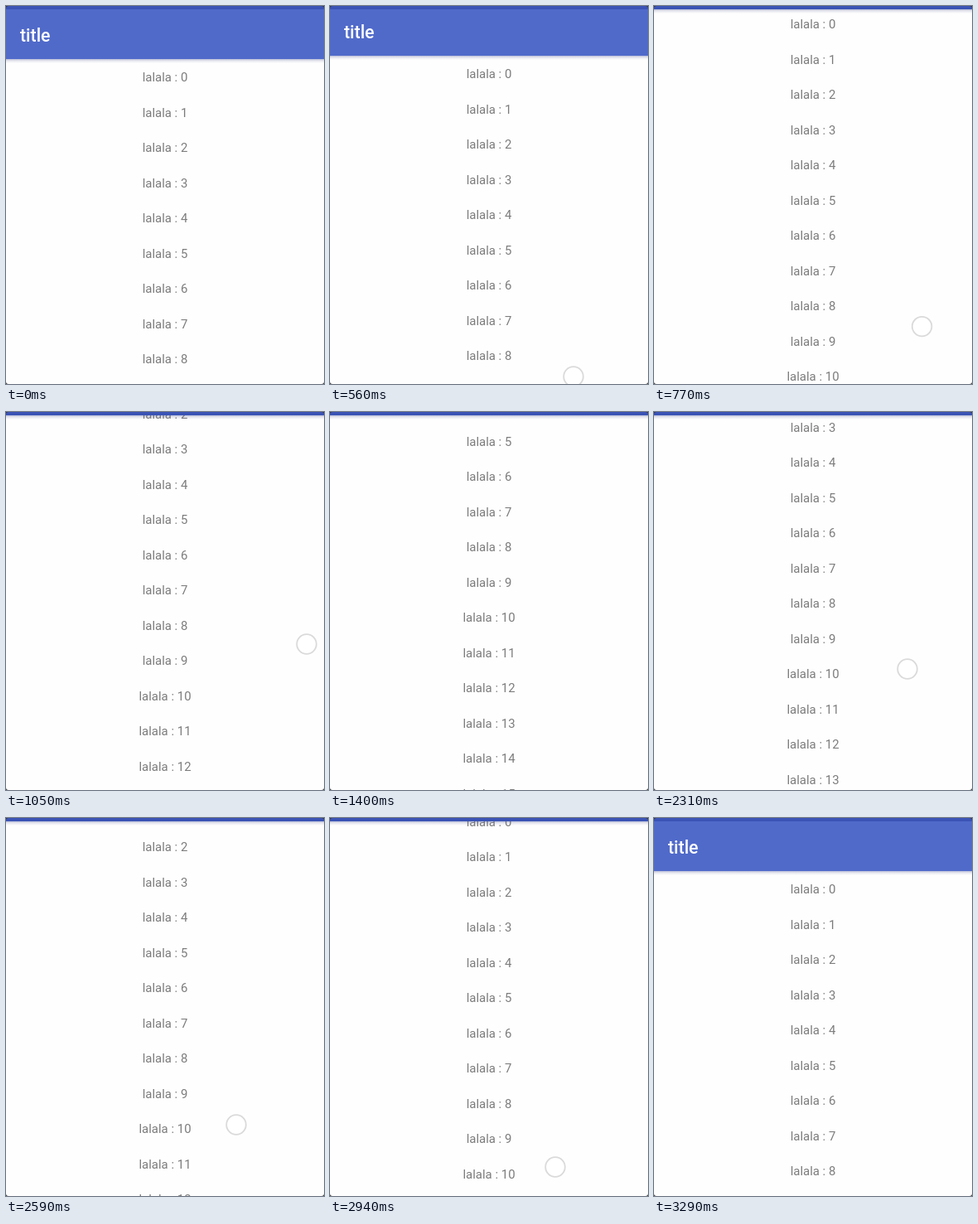
These frames come from a looping animation (384x456 px, 3780 ms). An HTML page with a canvas:

```html
<!DOCTYPE html>
<html lang="en">
<head>
<meta charset="utf-8">
<title>Collapsing toolbar list</title>
<style>
  html, body { margin: 0; width: 100%; height: 100%; overflow: hidden; background: #fefefe; }
  canvas { display: block; width: 384px; height: 456px; }
</style>
</head>
<body>
<canvas id="stage"></canvas>
<script>
const W = 384, H = 456, LOOP = 3780, STEP = 70;
const STATUS = 4, BAR = 60, ROW = 42.5;

const canvas = document.getElementById('stage');
const ctx = canvas.getContext('2d');
const dpr = window.devicePixelRatio || 1;
canvas.width = W * dpr;
canvas.height = H * dpr;
ctx.scale(dpr, dpr);

const linear = u => u;
const speedUp = u => u ** 1.2;
const slowDown = u => 1 - (1 - u) ** 2;

// Keys are [time, value, ease towards this key].
function track(keys, t) {
  const i = keys.findIndex(k => k[0] > t);
  if (i === 0) return keys[0][1];
  if (i < 0) return keys[keys.length - 1][1];
  const [t0, v0] = keys[i - 1], [t1, v1, ease = linear] = keys[i];
  return v0 + (v1 - v0) * ease((t - t0) / (t1 - t0));
}

const scrollKeys = [
  [490, 0], [560, 4], [1050, 168.5, speedUp], [1540, 271, slowDown],
  [1960, 271], [2030, 268], [2310, 195], [2590, 136],
  [2940, 81.5], [3080, 55], [3290, 0]
];

const touches = [
  { from: 560, to: 1190,
    x: [[560, 294], [1050, 363], [1120, 371]],
    y: [[560, 447], [1050, 280, speedUp], [1120, 254]] },
  { from: 1960, to: 3290,
    x: [[1960, 361], [2030, 356], [2310, 306], [2590, 278], [2940, 272]],
    y: [[1960, 220], [2030, 234], [2310, 310], [2590, 370], [2940, 421], [3080, 446], [3220, 475]] }
];

function drawList(scroll) {
  ctx.font = '14.93px Roboto, sans-serif';
  ctx.textAlign = 'center';
  ctx.fillStyle = '#7c7c7c';
  const first = Math.max(0, Math.floor((scroll - 100) / ROW));
  for (let n = first; n < first + 15; n++) {
    ctx.fillText('lalala : ' + n, W / 2, 91 + n * ROW - scroll);
  }
}

function drawToolbar(scroll) {
  const top = STATUS - Math.min(scroll, BAR), bottom = top + BAR;
  const shade = ctx.createLinearGradient(0, bottom, 0, bottom + 5);
  shade.addColorStop(0, 'rgba(70, 80, 150, 0.36)');
  shade.addColorStop(0.5, 'rgba(90, 95, 150, 0.12)');
  shade.addColorStop(1, 'rgba(90, 95, 150, 0)');
  ctx.fillStyle = shade;
  ctx.fillRect(0, bottom, W, 5);

  ctx.fillStyle = '#506aca';
  ctx.fillRect(0, top, W, BAR);
  ctx.font = '500 21.33px Roboto, sans-serif';
  ctx.textAlign = 'left';
  ctx.fillStyle = '#fff';
  ctx.fillText('title', 17, top + 38.5);

  ctx.fillStyle = '#3a53b5';
  ctx.fillRect(0, 0, W, STATUS);
}

function drawTouch(t) {
  const touch = touches.find(p => t >= p.from && t < p.to);
  if (!touch) return;
  ctx.beginPath();
  ctx.arc(track(touch.x, t), track(touch.y, t), 11.8, 0, Math.PI * 2);
  ctx.fillStyle = 'rgba(255, 255, 255, 0.8)';
  ctx.fill();
  ctx.lineWidth = 1.8;
  ctx.strokeStyle = '#dadada';
  ctx.stroke();
}

function drawCorners() {
  ctx.beginPath();
  ctx.rect(0, 0, W, H);
  ctx.roundRect(0, 0, W, H, 3);
  ctx.fillStyle = '#333';
  ctx.fill('evenodd');
}

function frame(now) {
  const t = Math.floor((now % LOOP) / STEP) * STEP;
  const scroll = track(scrollKeys, t);
  ctx.fillStyle = '#fefefe';
  ctx.fillRect(0, 0, W, H);
  drawList(scroll);
  drawToolbar(scroll);
  drawTouch(t);
  drawCorners();
}

const start = performance.now();
function tick() {
  frame(performance.now() - start);
  requestAnimationFrame(tick);
}
tick();
</script>
</body>
</html>
```
